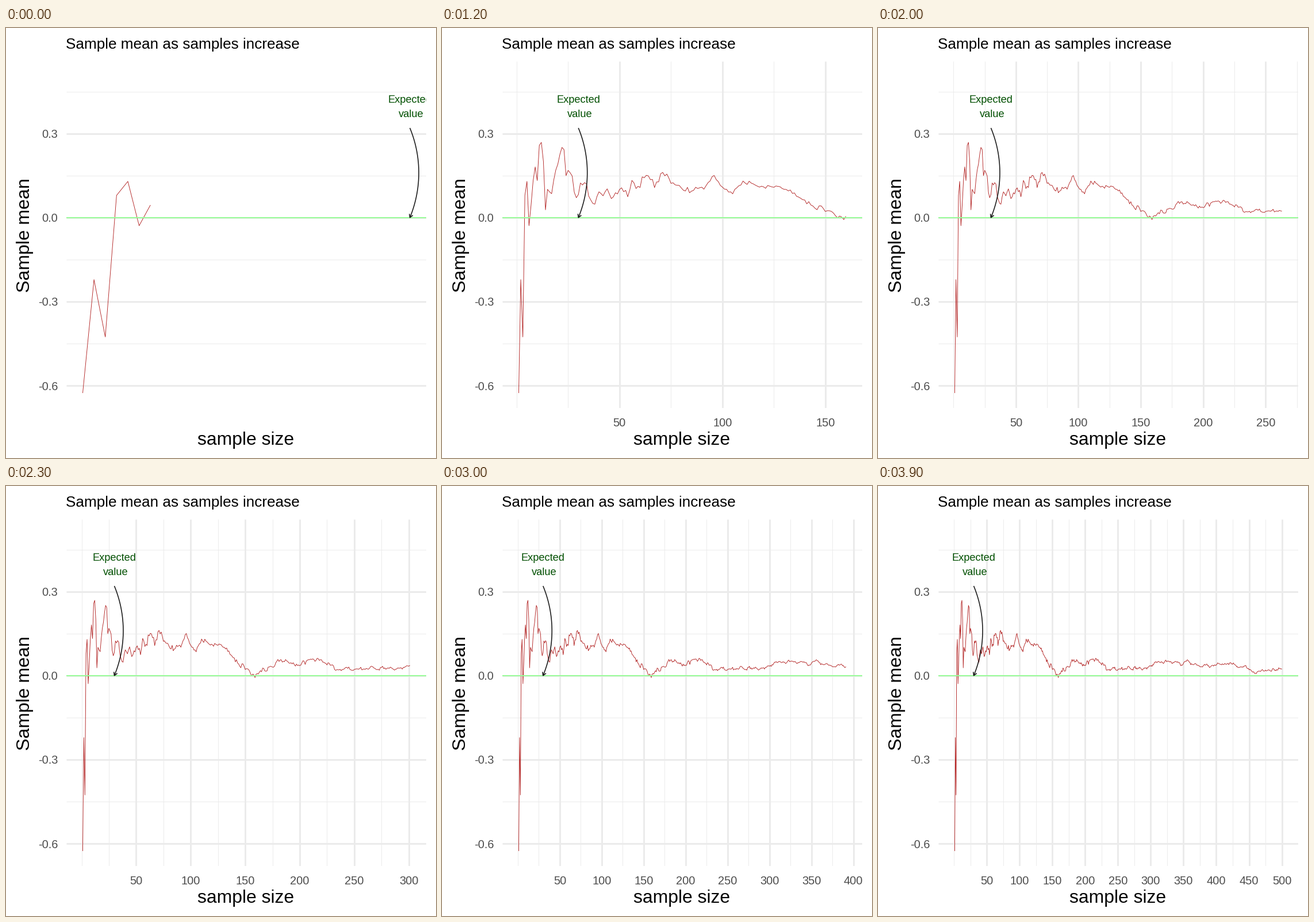
A matplotlib script that plays this animation: 748 by 748 pixels, repeating every 5000 ms.

```python
import math

import numpy as np
import matplotlib.pyplot as plt
from matplotlib.animation import FuncAnimation

SIZE, DPI = 748, 100
PT = 72 / DPI                                  # points per pixel
LEFT, RIGHT, TOP, BOTTOM = 105, 731, 58, 661   # panel edges in pixels
ZERO_Y, UNIT_Y = 329.8, 487.2
SAMPLES, STEPS, FRAMES = 500, 39, 50
NOTE_X, NOTE_Y = 30, 0.32
GRID, TICK, GREEN, LINE = "#EBEBEB", "#4D4D4D", "#98FB98", "#B22222"
NOTE, ARROW = "#004F00", "#1A1A1A"

plt.rcParams["font.family"] = "Liberation Sans"
plt.rcParams["path.simplify"] = False


def normal_draws(count, seed=1):
    """Normal deviates by inversion from a congruentially seeded Mersenne Twister."""
    words = []
    for _ in range(50 + 625):
        seed = (69069 * seed + 1) % 2**32
        words.append(seed)
    twister = np.random.MT19937()
    twister.state = {"bit_generator": "MT19937",
                     "state": {"key": np.array(words[51:], dtype=np.uint32), "pos": 624}}
    u = twister.random_raw(2 * count) / 2**32
    big = 2**27
    p = (np.floor(big * u[::2]) + u[1::2]) / big
    z = np.linspace(-5, 5, 20001)
    cdf = [0.5 * math.erfc(-v / math.sqrt(2)) for v in z]
    return np.interp(p, cdf, z)


sizes = np.arange(1, SAMPLES + 1)
means = np.cumsum(normal_draws(SAMPLES)) / sizes

fig = plt.figure(figsize=(SIZE / DPI, SIZE / DPI), dpi=DPI, facecolor="white")
ax = fig.add_axes([LEFT / SIZE, 1 - BOTTOM / SIZE,
                   (RIGHT - LEFT) / SIZE, (BOTTOM - TOP) / SIZE])


def to_y(value):
    return ZERO_Y - UNIT_Y * value


def stroke(x, y, width, color, z):
    ax.plot(x, y, color=color, lw=width * PT, zorder=z,
            solid_capstyle="butt", solid_joinstyle="round")


def label(x, y, text, size, color="black", ha="center", **options):
    ax.text(x, y, text, fontsize=size * PT, color=color, ha=ha, va="baseline", **options)


def draw_y_grid():
    for i in range(-4, 4):
        value = 0.15 * i
        major = i % 2 == 0
        stroke([LEFT, RIGHT], [to_y(value)] * 2, 3 if major else 1, GRID, 2 if major else 1)
        if major:
            label(90, to_y(value) + 7.5, f"{value:.1f}", 20, TICK, "right")


def draw_x_grid(to_x, low, high):
    majors = [b for b in range(50, SAMPLES + 1, 50) if b <= high]
    if len(majors) > 1:
        for b in range(0, int(high) + 1, 25):
            if b >= low and b not in majors:
                stroke([to_x(b)] * 2, [TOP, BOTTOM], 1, GRID, 1)
    for b in majors:
        stroke([to_x(b)] * 2, [TOP, BOTTOM], 3, GRID, 2)
        label(to_x(b), 693, str(b), 20, TICK)


def draw_note(x):
    label(x, 130, "Expected", 18.3, NOTE, clip_on=True, zorder=5)
    label(x + 2.3, 155, "value", 18.3, NOTE, clip_on=True, zorder=5)

    start, end = to_y(NOTE_Y), to_y(0)
    half, bulge, barb = (end - start) / 2, 15.5, 6.5
    radius = (half**2 + bulge**2) / (2 * bulge)
    sweep = math.asin(half / radius)
    a = np.linspace(-sweep, sweep, 30)
    stroke(x + bulge - radius * (1 - np.cos(a)), start + half + radius * np.sin(a),
           1.6, ARROW, 6)
    b1, b2 = sweep - math.pi / 6, sweep + math.pi / 6
    stroke([x + barb * math.sin(b1), x, x + barb * math.sin(b2)],
           [end - barb * math.cos(b1), end, end - barb * math.cos(b2)],
           1.6, ARROW, 6)


def draw(frame):
    ax.clear()
    ax.set_xlim(LEFT, RIGHT)
    ax.set_ylim(BOTTOM, TOP)
    ax.axis("off")

    step = min(frame, STEPS)
    shown = min(SAMPLES, int(1 + (SAMPLES - 1) / STEPS * (step + 0.5)))
    last = max(shown, NOTE_X)
    margin = 0.05 * (last - 1)
    low, high = 1 - margin, last + margin

    def to_x(n):
        return LEFT + (RIGHT - LEFT) * (n - low) / (high - low)

    draw_y_grid()
    draw_x_grid(to_x, low, high)
    stroke(to_x(sizes[:shown]), to_y(means[:shown]), 0.9, LINE, 3)
    stroke([LEFT, RIGHT], [to_y(0)] * 2, 2, GREEN, 4)
    draw_note(to_x(NOTE_X))

    label(104, 36, "Sample mean as samples increase", 26.1, ha="left")
    label(417.5, 725, "sample size", 31.9)
    label(41, 360.5, "Sample mean", 32.3, rotation=90, rotation_mode="anchor")
    return []


anim = FuncAnimation(fig, draw, frames=FRAMES, interval=100, init_func=lambda: [],
                     repeat=True, repeat_delay=0, blit=False)
plt.show()
```
